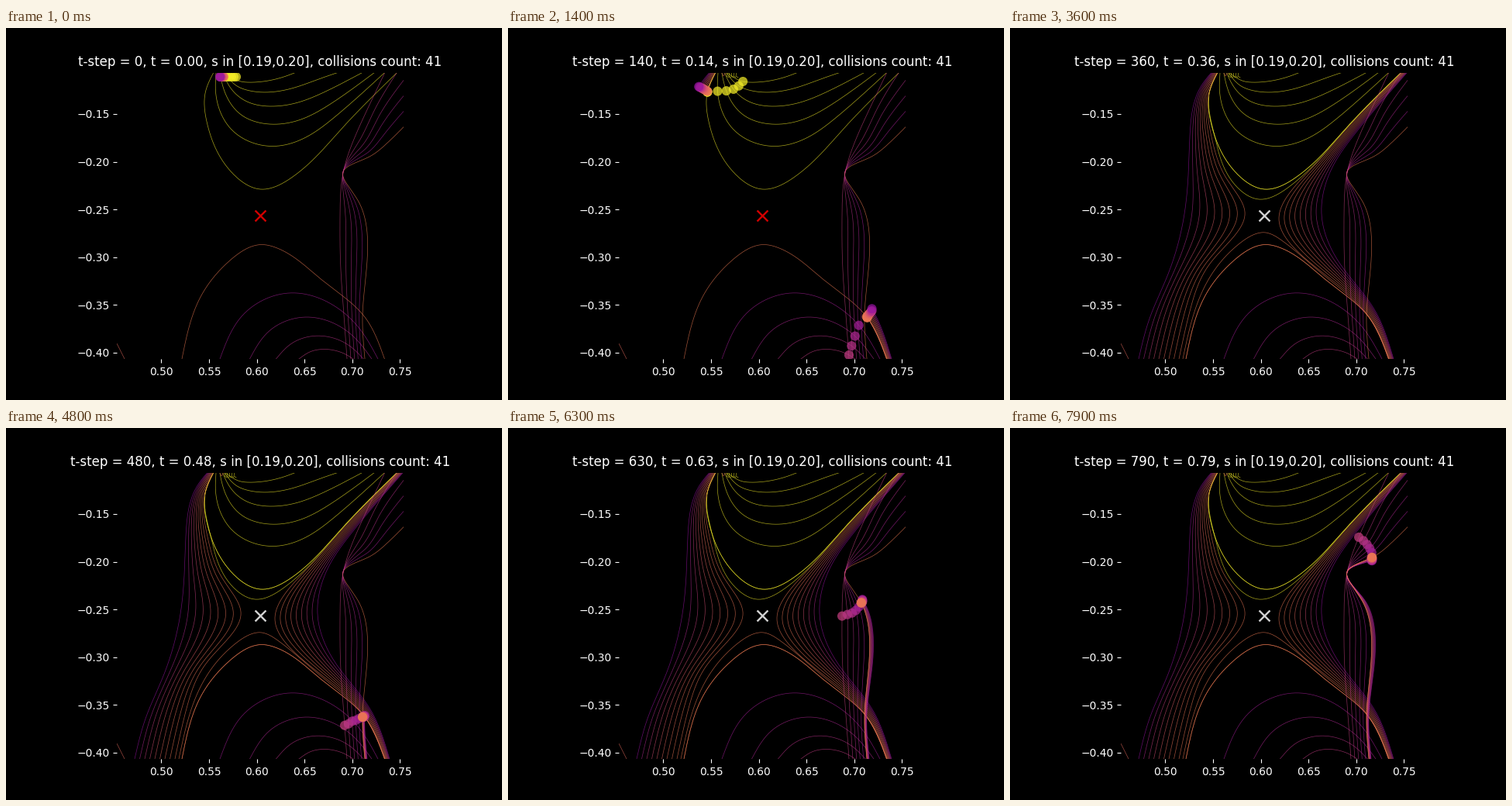
Animation, 640 px wide and 480 px high, one loop 8 s. Source, as a matplotlib script:

```python
import numpy as np
import matplotlib.pyplot as plt
from matplotlib.animation import FuncAnimation

FRAMES, INTERVAL = 80, 100
SCALE = 1232                      # pixels per data unit
SADDLE = np.array([0.6035, -0.2567])
MIDDLE = np.array([328, 242.4])
YELLOW, ORANGE = 0.97, 0.67       # positions in the colour map
CLUSTER = 9                       # runs that switch to the side branches

plt.style.use("dark_background")
fig = plt.figure(figsize=(6.4, 4.8), dpi=100)
ax = fig.add_subplot()
ax.set_aspect("equal")
ax.set_xlim(SADDLE[0] - 0.15, SADDLE[0] + 0.15)
ax.set_ylim(SADDLE[1] - 0.15, SADDLE[1] + 0.15)
ax.spines[:].set_visible(False)
title = ax.set_title("")


def to_data(p):
    return (np.asarray(p, float) - MIDDLE) * [1, -1] / SCALE + SADDLE


def draw(p, color):
    return ax.plot(*to_data(p).T, color=plt.cm.plasma(color), lw=0.5, alpha=0.68)[0]


def spline(points, n=240):
    """Natural cubic spline through the points, with straight run-outs."""
    p = np.asarray(points, float)
    h = np.linalg.norm(np.diff(p, axis=0), axis=1)
    k = np.r_[0, np.cumsum(h)]
    m = np.eye(len(p))
    rhs = np.zeros_like(p)
    slope = np.diff(p, axis=0) / h[:, None]
    for i in range(1, len(p) - 1):
        m[i, i - 1:i + 2] = h[i - 1], 2 * (h[i - 1] + h[i]), h[i]
        rhs[i] = 6 * (slope[i] - slope[i - 1])
    curve = np.linalg.solve(m, rhs)
    x = np.linspace(0, k[-1], n)
    i = np.clip(np.searchsorted(k, x) - 1, 0, len(h) - 1)
    a, b, w = (k[i + 1] - x)[:, None], (x - k[i])[:, None], h[i][:, None]
    out = ((curve[i] * a**3 + curve[i + 1] * b**3) / (6 * w)
           + (p[i] / w - curve[i] * w / 6) * a
           + (p[i + 1] / w - curve[i + 1] * w / 6) * b)
    head, tail = out[0] - out[1], out[-1] - out[-2]
    head, tail = (12 * v / np.linalg.norm(v) for v in (head, tail))
    return np.vstack([out[0] + head, out, out[-1] + tail])


def blend(keys, u):
    """Lagrange blend of two or three key curves, u from 0 to 1."""
    nodes = np.linspace(0, 1, len(keys))
    total = 0
    for i, key in enumerate(keys):
        others = np.delete(nodes, i)
        total = total + np.prod((u - others) / (nodes[i] - others)) * np.array(key)
    return total


class Track:
    """A path with a dot on it; the line is whole or grows behind the dot.

    stops maps times to the key points that the dot passes then.
    """

    def __init__(self, points, color, stops, grows=False, start=None):
        self.xy = spline(points)
        self.len = np.r_[0, np.cumsum(
            np.linalg.norm(np.diff(self.xy, axis=0), axis=1))]
        reach = [self.len[np.argmin(((self.xy - points[i]) ** 2).sum(1))]
                 for i in stops.values()]
        self.motion = np.polyfit(list(stops), reach, len(stops) - 1)
        self.start, self.grows = start, grows
        self.color = plt.cm.plasma(color)
        self.line = draw(self.xy, color)

    def point(self, s):
        return np.array([np.interp(s, self.len, c) for c in self.xy.T])

    def at(self, t):
        s = np.polyval(self.motion, t)
        if self.grows:
            tip = np.clip(s, 0, self.len[-1])
            part = np.vstack([self.xy[self.len <= tip], self.point(tip)])
            self.line.set_data(*to_data(part).T)
        if self.start and t < 0.5:
            return np.array(self.start) - [0, 130 * t * t]
        return self.point(s) if 0 <= s <= self.len[-1] else np.array([-99, -99])


# key curves, each family from its first to its last member
CUPS = [
    [(282, 57), (303, 69), (311, 70), (320, 70), (360, 62.5), (400, 47), (445, 37)],
    [(279, 57), (291, 79), (309, 94), (344, 101), (377, 96), (409, 83.5), (457, 59)],
    [(271, 57), (270.5, 82), (291, 131), (343, 152.5), (385, 142), (424, 115),
     (487, 59)],
]
ARCS = [
    [(448, 427), (440, 422), (410, 414.5), (392, 418), (378, 427)],
    [(467, 427), (445.5, 404), (394, 386), (353, 401), (332, 427)],
    [(480, 427), (453, 384), (365, 342), (305, 371), (276, 427)],
]
NEAR_CUPS = [
    [(268, 57), (257.5, 82), (260, 125), (290, 185), (328, 208), (370, 192),
     (433, 130), (503, 59)],
    [(268, 57), (257.5, 82), (263, 135), (286, 197), (321, 221), (360, 205),
     (433, 130.5), (504, 58)],
]
NEAR_ARCS = [
    [(488.5, 427), (463, 373), (410, 327), (350, 284), (330, 279.5), (290, 299),
     (248, 353), (227, 427)],
    [(489, 427), (463, 373), (405, 319), (352, 275), (330, 264), (295, 279),
     (245, 347), (223, 427)],
]
LEFT = [
    [(268, 57), (257.5, 82), (261, 145), (278, 192), (303, 237), (258, 304),
     (234, 358), (218, 427)],
    [(262, 55), (246, 76), (232, 140), (230, 190), (225, 240), (203, 320),
     (180, 375), (166, 427)],
]
RIGHT = [
    [(489, 427), (463, 372), (400, 313), (347, 247), (397, 173), (434, 131),
     (505, 58)],
    [(495, 427), (470, 363), (425, 303), (402, 240), (420, 172), (443, 139),
     (511, 59)],
]
STREAM = [
    [(440, 427), (437, 384), (431.5, 300), (431, 242), (432, 210), (435, 187),
     (450, 141), (470, 97), (490, 55)],
    [(452, 427), (449, 378), (449, 300), (446.5, 237), (438.5, 208), (434.5, 188),
     (462.5, 153), (481, 123), (520, 69)],
    [(463, 427), (460, 373), (466, 300), (456, 226), (443, 206), (434.5, 188),
     (467, 167), (488, 152), (530, 110)],
]
LATE = {4.8: 1, 6.3: 3, 7.9: 6}

tracks = []


def add(*args, **kw):
    tracks.append(Track(*args, **kw))


# separate runs
for i, u in enumerate(np.linspace(0, 1, 5)):
    x = 297 - 3 * i
    add(blend(CUPS, u), YELLOW, {1.4: 1, 2.2: 5}, start=(x, 63))
    draw([(x, 64), (x - 3, 62), (x - 2, 57)], YELLOW)
for u in np.linspace(0, 1, 4):
    add(blend(ARCS, u), 0.46 - 0.1 * u, {1.4: 1, 2.05: -1})

# runs next to the branching, the first one drawn in advance
for u, grows in ((0, False), (0, True), (1, True)):
    add(blend(NEAR_CUPS, u), YELLOW, {1.4: 1, 2.2: 6}, grows, (282, 63))
    add(blend(NEAR_ARCS, u), ORANGE, {1.4: 1, 2.13: -1}, grows)

for v in np.linspace(0, 1, CLUSTER):
    color = 0.66 - 0.34 * v**2
    add(blend(LEFT, v), color, {1.4: 1, 2.13: -1}, True, (281 - 5 * v, 63))
    add(blend(RIGHT, v), color, {1.4: 1, 2.2: 5}, True)

# late stream on the right
for u in np.arange(0, 1, 0.2):
    add(blend(STREAM, u), 0.47 - 0.13 * u, LATE)
for v in np.linspace(1, 0, CLUSTER):
    add(blend(STREAM, 1 + 0.14 * v), 0.62 - 0.27 * v**0.7, LATE, True)
add(blend(STREAM, 1), ORANGE, LATE)

draw([(140, 402), (144, 409), (153, 427), (155, 431)], 0.62)
draw([(276, 58), (278, 62), (281, 58)], 0.62)

dots = ax.scatter(*np.zeros((2, len(tracks))), s=76, linewidths=0, alpha=0.72,
                  c=[k.color for k in tracks], zorder=3)
cross = ax.scatter(*SADDLE, s=100, marker="x", linewidths=1.7, alpha=0.83, c="red",
                   zorder=4)


def update(i):
    step = 10 * i
    title.set_text(f"t-step = {step}, t = {step / 1000:.2f}, "
                   "s in [0.19,0.20], collisions count: 41")
    dots.set_offsets(to_data([k.at(i / 10) for k in tracks]))
    cross.set_color("white" if step >= 180 else "red")
    return [title, dots, cross]


anim = FuncAnimation(fig, update, frames=FRAMES, interval=INTERVAL,
                     repeat=True, repeat_delay=0, blit=False)
plt.show()
```
